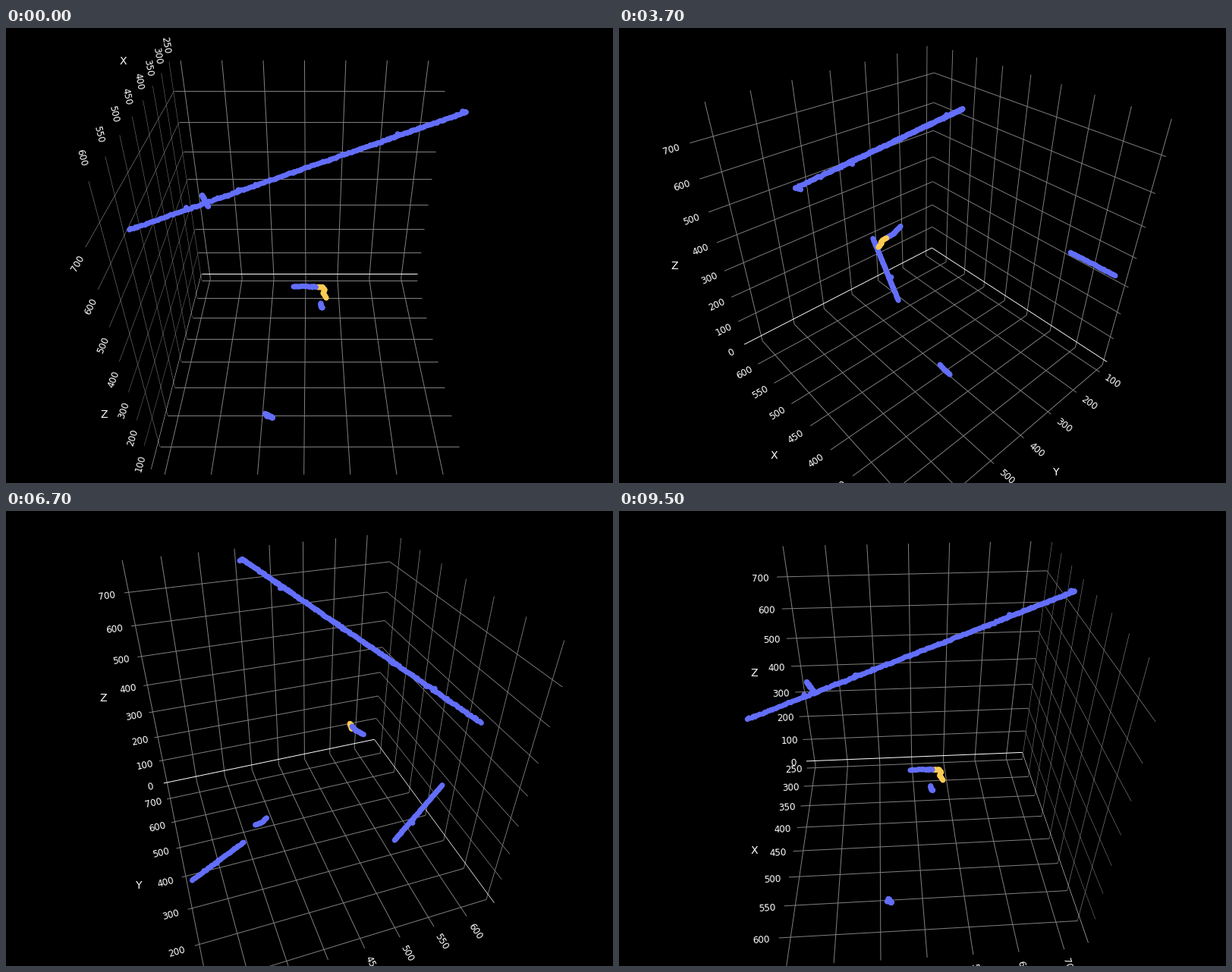
A matplotlib script that plays this animation: 800 px wide and 600 px high, repeating every 9600 ms.

```python
import numpy as np
import matplotlib.pyplot as plt
from matplotlib.animation import FuncAnimation
from matplotlib.collections import LineCollection

W, H, DPI = 800, 600, 100
FRAMES, INTERVAL = 96, 100
PX = 72 / DPI                       # one pixel in points
FOCAL = H / 2 / np.tan(np.pi / 8)   # 45 degree vertical view angle
EYE_R, EYE_Z = 1.5, 1.1
DIST = np.hypot(EYE_R, EYE_Z)
CE, SE = EYE_R / DIST, EYE_Z / DIST
TICK_PAD, TITLE_PAD = 0.0585, 0.151

BLUE, YELLOW = "#636efa", "#fecb52"
GRID, ZERO = "#808080", "#ffffff"

plt.rcParams["font.family"] = "DejaVu Sans"

# data extent of each axis, padded by 1/32 on both sides, fills a unit cube
EXTENT = [(256, 629), (94, 730), (0, 766)]
TICKS = [range(250, 601, 50), range(100, 701, 100), range(0, 701, 100)]


def to_cube(axis, value):
    lo, hi = EXTENT[axis]
    return (value - (lo + hi) / 2) / ((hi - lo) * 17 / 16)


def project(points, angle):
    """Screen position in pixels and depth of points in the cube."""
    x, y, z = np.asarray(points, float).T
    c, s = np.cos(angle), np.sin(angle)
    toward, right = c * x + s * y, c * y - s * x
    depth = DIST - CE * toward - SE * z
    sx = W / 2 + FOCAL * right / depth
    sy = H / 2 - FOCAL * (CE * z - SE * toward) / depth
    return np.column_stack([sx, sy]), depth


# ---------- point cloud ----------
rng = np.random.default_rng(4)


def trace(knots, count, jitter=0.0007):
    """Points spread evenly along a polyline, slightly rough."""
    knots = np.array(knots)
    steps = np.linalg.norm(np.diff(knots, axis=0), axis=1)
    dist = np.append(0, np.cumsum(steps))
    at = np.linspace(0, dist[-1], count)
    pts = np.column_stack([np.interp(at, dist, k) for k in knots.T])
    pts[1:-1] += rng.normal(0, jitter, (count - 2, 3))
    return pts


def bump(start, end, t, shift):
    """A few points standing out from a line at fraction t."""
    base = np.array(start) + t * (np.array(end) - np.array(start))
    return trace([base, base + np.array(shift)], 4, 0)


LONG = (0.302, -0.4706, 0.305), (-0.088, 0.4706, 0.4706)
SIDE = (0.4706, -0.131, -0.233), (0.304, -0.127, -0.4706)

blue_parts = [
    trace(LONG, 260, 0.001),
    bump(*LONG, 0.775, (-0.013, 0, 0)),
    bump(*LONG, 0.293, (-0.007, 0, 0.002)),
    bump(*LONG, 0.151, (0, 0, 0.007)),
    trace([LONG[1], (-0.099, 0.463, 0.4686)], 5, 0),
    trace(SIDE, 75),
    bump(*SIDE, 0.64, (0, -0.011, 0)),
    trace([(-0.32, -0.391, 0), (-0.4706, -0.442, -0.038)], 50),
    trace([(-0.154, 0.052, -0.373), (-0.172, 0.048, -0.386),
           (-0.2, 0.0465, -0.390)], 18),
    trace([(0.177, -0.0496, 0.0095), (0.1655, -0.008, 0.001),
           (0.1647, 0.0225, -0.002)], 24),
]
yellow = trace([(0.1647, 0.025, -0.002), (0.165, 0.043, -0.0033),
                (0.168, 0.0475, -0.012), (0.172, 0.043, -0.021),
                (0.1784, 0.053, -0.0358)], 26)

blue = np.vstack(blue_parts)
cloud = np.vstack([blue, yellow])
hues = np.array([BLUE] * len(blue) + [YELLOW] * len(yellow))

# ---------- figure ----------
fig = plt.figure(figsize=(W / DPI, H / DPI), dpi=DPI, facecolor="black")
ax = fig.add_axes([0, 0, 1, 1])
ax.set_xlim(0, W)
ax.set_ylim(H, 0)
ax.axis("off")

grid = LineCollection([], zorder=1)
ax.add_collection(grid)
dots = ax.scatter(np.zeros(len(cloud)), np.zeros(len(cloud)),
                  s=(7 * PX) ** 2, linewidths=0, zorder=3)


def label(text, size):
    return ax.text(0, 0, text, color="white", fontsize=size * PX, ha="center",
                   va="center_baseline", rotation_mode="anchor", zorder=2)


tick_labels = [[label(str(v), 12) for v in ticks] for ticks in TICKS]
titles = [label(name, 14) for name in "XYZ"]


# ---------- cube layout ----------
def bit(corner, axis):
    return corner >> axis & 1


def side(corner, axis):
    return bit(corner, axis) - 0.5


CORNERS = [[side(i, a) for a in range(3)] for i in range(8)]


def near_corner(angle):
    x, y = np.round([np.cos(angle), np.sin(angle)], 9)
    return int(x >= 0) + 2 * int(y >= 0) + 4


def label_edges(angle, near):
    """For each axis, a corner code of the silhouette edge with its labels."""
    far = 7 ^ near
    pos = np.round(project(CORNERS, angle)[0], 6)
    free = [i for i in range(8) if i not in (near, far)]
    bottom = max(free, key=lambda i: pos[i, 1])
    nexts = [bottom ^ 1 << a for a in range(3) if bottom ^ 1 << a in free]
    left = min(nexts, key=lambda i: pos[i, 0])
    right = max(nexts, key=lambda i: pos[i, 0])
    pairs = [(left, bottom), (bottom, right)]
    top = right ^ 7
    if top in (near, far):
        pairs.append((right, left ^ 7))
    else:
        pairs.append((left, top))
    edges = [0, 0, 0]
    for a, b in pairs:
        edges[(a ^ b).bit_length() - 1] = a & b
    return edges


def grid_lines(far):
    """Ends, midpoints and tick direction of every grid line."""
    ends, shifted, zero = [], [], []
    for axis in range(3):
        for wall in range(3):
            if wall == axis:
                continue
            along = 3 - axis - wall
            for value in TICKS[axis]:
                p = np.zeros(3)
                p[axis] = to_cube(axis, value)
                p[wall] = side(far, wall)
                q, near_mid = p.copy(), p.copy()
                p[along], q[along] = -0.5, 0.5
                near_mid[axis] += 0.01
                ends += [p, q]
                shifted.append(near_mid)
                zero.append(axis == 2 and value == 0)
    return np.array(ends), np.array(shifted), np.array(zero)


def cross_sine(u, v):
    cross = u[:, 0] * v[:, 1] - u[:, 1] * v[:, 0]
    return np.abs(cross) / np.hypot(*u.T) / np.hypot(*v.T)


def draw_grid(angle, far):
    ends, shifted, zero = grid_lines(far)
    segs = project(ends, angle)[0].reshape(-1, 2, 2)
    mids = project((ends[::2] + ends[1::2]) / 2, angle)[0]
    ticks_dir = project(shifted, angle)[0] - mids
    # lines are widened along the tick axis, so slanted ones get thinner
    width = cross_sine(segs[:, 1] - segs[:, 0], ticks_dir)
    order = np.argsort(zero, kind="stable")
    grid.set_segments(segs[order])
    grid.set_linewidths(width[order] * PX)
    grid.set_colors([ZERO if z else GRID for z in zero[order]])


def draw_labels(angle, near, far):
    for axis, edge in enumerate(label_edges(angle, near)):
        others = [a for a in range(3) if a != axis]
        out_axis = next(a for a in others if bit(edge, a) != bit(far, a))
        base = np.array([side(edge, a) for a in range(3)])
        out = np.zeros(3)
        out[out_axis] = 2 * base[out_axis]

        for value, text in zip(TICKS[axis], tick_labels[axis]):
            base[axis] = to_cube(axis, value)
            p = base + TICK_PAD * out
            (a, b), _ = project([p, p + 0.01 * out], angle)
            dx, dy = b - a
            turn = np.degrees(np.arctan2(-dy, dx))
            text.set_position(a)
            text.set_rotation((turn + 90) % 180 - 90)

        base[axis] = 0
        spot, _ = project([base + TITLE_PAD * out], angle)
        titles[axis].set_position(spot[0])


def update(i):
    angle = 2 * np.pi * i / FRAMES
    near = near_corner(angle)
    far = 7 ^ near
    draw_grid(angle, far)
    draw_labels(angle, near, far)
    pos, depth = project(cloud, angle)
    order = np.argsort(-depth)
    dots.set_offsets(pos[order])
    dots.set_facecolors(hues[order])
    return []


anim = FuncAnimation(fig, update, frames=FRAMES, interval=INTERVAL,
                     init_func=lambda: [], repeat=True, repeat_delay=0)
plt.show()
```
